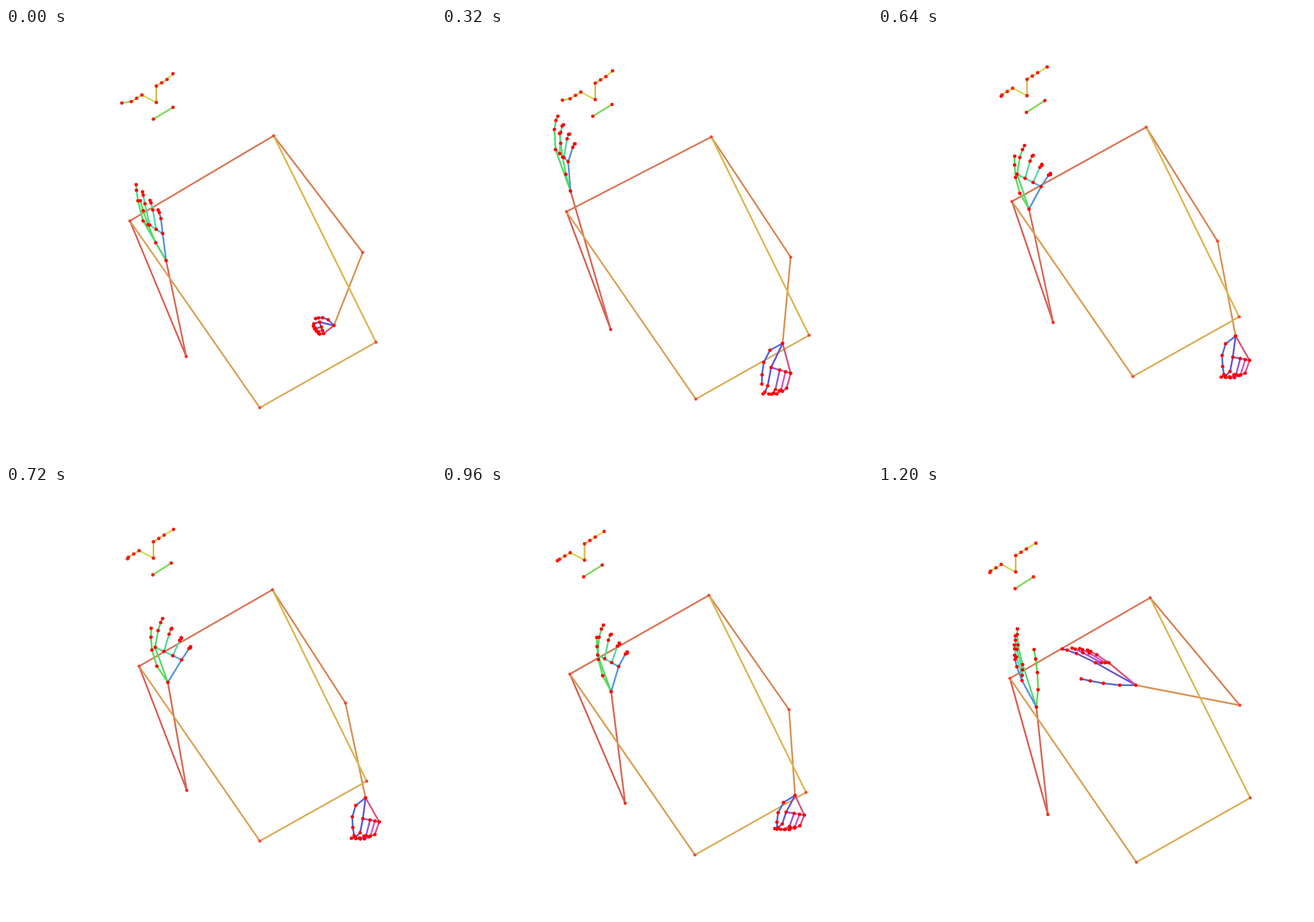
These frames come from a looping animation (748x748 px, 1.28 s). An HTML page with a canvas:

```html
<!DOCTYPE html>
<html>
<head>
<meta charset="utf-8">
<style>
html, body { margin: 0; height: 100%; overflow: hidden; background: #fff }
canvas { display: block }
</style>
</head>
<body>
<canvas id="stage" width="748" height="748"></canvas>
<script>
const ctx = document.getElementById('stage').getContext('2d');
const STEP = 80, COUNT = 16;
const KEYS = [0, 4, 6, 9, 11, 13, 15];

const mix = (a, b, s) => a.map((v, c) => v + (b[c] - v) * s);
const add = (a, b, k = 1) => a.map((v, c) => v + b[c] * k);
const scale = (a, k) => a.map(v => v * k);
const pairs = row => row.flatMap((v, i) => i % 2 ? [] : [[v, row[i + 1]]]);

// Smooth cyclic curve without overshoot through one row per key time.
function track(...rows) {
  const n = KEYS.length;
  const gap = i => (KEYS[(i + 1) % n] - KEYS[i % n] + COUNT) % COUNT;
  const slope = (i, c) => (rows[(i + 1) % n][c] - rows[i % n][c]) / gap(i);
  const tangent = (i, c) => {
    const a = slope(i + n - 1, c), b = slope(i, c);
    return a * b > 0 ? 2 * a * b / (a + b) : 0;
  };
  return t => {
    const i = KEYS.findLastIndex(k => k <= t), j = (i + 1) % n;
    const h = gap(i), u = (t - KEYS[i]) / h, v = 1 - u;
    return rows[i].map((p, c) =>
      p * v * v * (1 + 2 * u) + rows[j][c] * u * u * (3 - 2 * u) +
      h * u * v * (v * tangent(i, c) - u * tangent(j, c)));
  };
}

// The figure dips early in the loop and rises halfway.
function bob(t) {
  if (t < 4) return 8 * Math.sin(Math.PI * t / 4);
  if (t > 6 && t < 9) return -8 * Math.sin(Math.PI * (t - 6) / 3);
  return 0;
}

// Shoulder, elbow, wrist of each side, then both hips.
const body = track(
  [215, 335, 313, 571, 278, 404, 465, 187, 620, 390, 570, 517, 441, 660, 643, 546],
  [216, 319, 293, 524, 223, 283, 468, 189, 606, 398, 592, 548, 441, 645, 638, 534],
  [234, 298, 284, 495, 224, 272, 470, 177, 590, 377, 609, 543, 445, 604, 629, 500],
  [231, 313, 314, 529, 281, 341, 463, 180, 590, 377, 625, 542, 441, 617, 627, 513],
  [224, 316, 320, 533, 294, 345, 456, 181, 586, 376, 627, 543, 434, 620, 620, 515],
  [221, 336, 314, 569, 293, 372, 472, 198, 623, 401, 584, 524, 446, 661, 646, 549],
  [229, 334, 295, 571, 275, 384, 473, 194, 629, 381, 448, 346, 449, 654, 647, 542]);

// Nose position and how far the head is turned.
const head = track([261, 129, 0], [266, 124, .2], [263, 122, 1], [256, 125, 1],
  [248, 124, 1], [247, 136, .7], [239, 149, 1]);

// Hand shapes seen from the wrist: thumb base and tip, then for index and
// little finger the knuckles, the middle joints and the tips.
const rise = [-18, -31, -45, -104, -40, -69, -6, -47, -49, -104, -9, -73, -52, -132, -14, -88];
const point = [-8, -29, -19, -100, -26, -72, -4, -51, -28, -107, 4, -76, -22, -130, 8, -82];
const tilt = [-7, -26, -13, -86, -17, -60, 8, -40, -13, -89, 20, -59, -4, -109, 28, -61];
const open = [-19, -28, -29, -94, -22, -61, 24, -39, -17, -90, 37, -59, -9, -111, 39, -60];
const side = [3, -30, -4, -100, -24, -74, -25, -46, -32, -108, -34, -70, -33, -136, -38, -90];
const fist = [-10, -10, -32, -12, -25, -6, -18, 14, -35, -3, -25, 15, -34, 4, -27, 12];
const loose = [-22, 12, -36, 71, -20, 42, 14, 52, -26, 74, 7, 78, -34, 88, -6, 83];
const hang = [-18, 14, -21, 69, -5, 38, 25, 44, -10, 64, 17, 67, -26, 74, -3, 70];
const fold = [-23, 9, -50, 39, -34, 11, -1, 15, -45, 21, -9, 25, -54, 26, -19, 28];
const reach = [-28, 0, -95, -11, -70, -39, -47, -39, -103, -55, -68, -53, -128, -63, -84, -61];
const leftHand = track(rise, point, tilt, open, open, scale(point, .95), side);
const rightHand = track(fist, loose, scale(hang, 1.05), scale(hang, .95), hang, fold, reach);

function line(a, b, hue) {
  ctx.strokeStyle = `hsl(${hue} 64% 59%)`;
  ctx.beginPath();
  ctx.moveTo(...a);
  ctx.lineTo(...b);
  ctx.stroke();
}

function chain(points, hue, rise = 0) {
  for (let i = 1; i < points.length; i++) line(points[i - 1], points[i], hue + rise * (i - 1));
}

function dots(points, color, r = 3) {
  ctx.fillStyle = color;
  for (const [x, y] of points) {
    ctx.beginPath();
    ctx.arc(x, y, r, 0, 7);
    ctx.fill();
  }
}

// Adds the outer joint, which carries on from the bend of the finger.
function finger(base, mid, tip) {
  const outer = mid.map((m, c) => m + .12 * (m - base[c]) + .5 * (tip[c] - m));
  return [base, mid, outer, tip];
}

// The fingers between index and little finger reach further and curl sooner.
function handFingers(shape, lean) {
  const [thumb, thumbTip, baseA, baseB, midA, midB, tipA, tipB] = pairs(shape);
  const curlA = add(tipA, midA, -1), curlB = add(tipB, midB, -1);
  const fingers = [finger(thumb, add(thumb, thumbTip, .3), thumbTip)];
  for (let i = 0; i < 4; i++) {
    const s = (i / 3) ** lean, arch = i % 3 ? .16 : 0;
    const base = mix(baseA, baseB, s);
    const flat = mix(midA, midB, s);
    const mid = add(flat, add(flat, base, -1), arch);
    fingers.push(finger(base, mid, add(mid, mix(curlA, curlB, 1 - (1 - s) ** 2))));
  }
  return fingers;
}

function drawHand(shape, wrist, lean, hues, palm) {
  const fingers = handFingers(shape, lean).map(f => f.map(p => add(p, wrist)));
  fingers.forEach((f, i) => chain(f, hues[i], 2));
  [0, 1, 4].forEach(i => line(wrist, fingers[i][0], i == 4 ? palm[3] : hues[i]));
  for (let i = 1; i < 4; i++) line(fingers[i][0], fingers[i + 1][0], palm[i - 1]);
  dots([wrist, ...fingers.flat()], '#f00');
}

function drawFace([x, y, turn]) {
  const eye = (dx, dy, dir) => [0, 1, 2].map(i => [x + dx + 9.3 * dir * i, y + dy - 5.8 * dir * i]);
  const nose = [x, y];
  const right = [...eye(0, -28.5, 1), [x + 29 + 6 * turn, y - 50]];
  const left = [...eye(-25, -13, -1), [x - 60 + 15 * turn, y + 1]];
  const mouth = [[x - 5 + 4 * turn, y + 29], [x + 29 + 2 * turn, y + 8.5]];
  chain([nose, ...right], 46, 4);
  chain([nose, ...left], 64, 8);
  chain(mouth, 103);
  dots([nose, ...right, ...left, ...mouth], '#fb1a14');
}

function draw(now) {
  const t = Math.floor(now / STEP) % COUNT;
  ctx.setTransform(1, 0, 0, 1, 0, 0);
  ctx.clearRect(0, 0, 748, 748);
  ctx.translate(.5, .5 + bob(t));
  ctx.lineWidth = 3;
  const [shL, elL, wrL, shR, elR, wrR, hipL, hipR] = pairs(body(t));
  chain([shL, elL, wrL], 5, 4);
  chain([shL, shR, elR, wrR], 15, 6.5);
  chain([shL, hipL, hipR, shR], 34, 5.5);
  dots([shL, shR, elR, hipL, hipR], '#f54a38', 2.7);
  dots([elL], '#fa2a20', 2.7);
  drawFace(head(t));
  drawHand(leftHand(t), wrL, 1, [113, 132, 145, 158, 213], [145, 160, 200, 210]);
  drawHand(rightHand(t), wrR, .75, [230, 246, 270, 308, 335], [268, 305, 335, 342]);
  requestAnimationFrame(draw);
}
requestAnimationFrame(draw);
</script>
</body>
</html>
```
